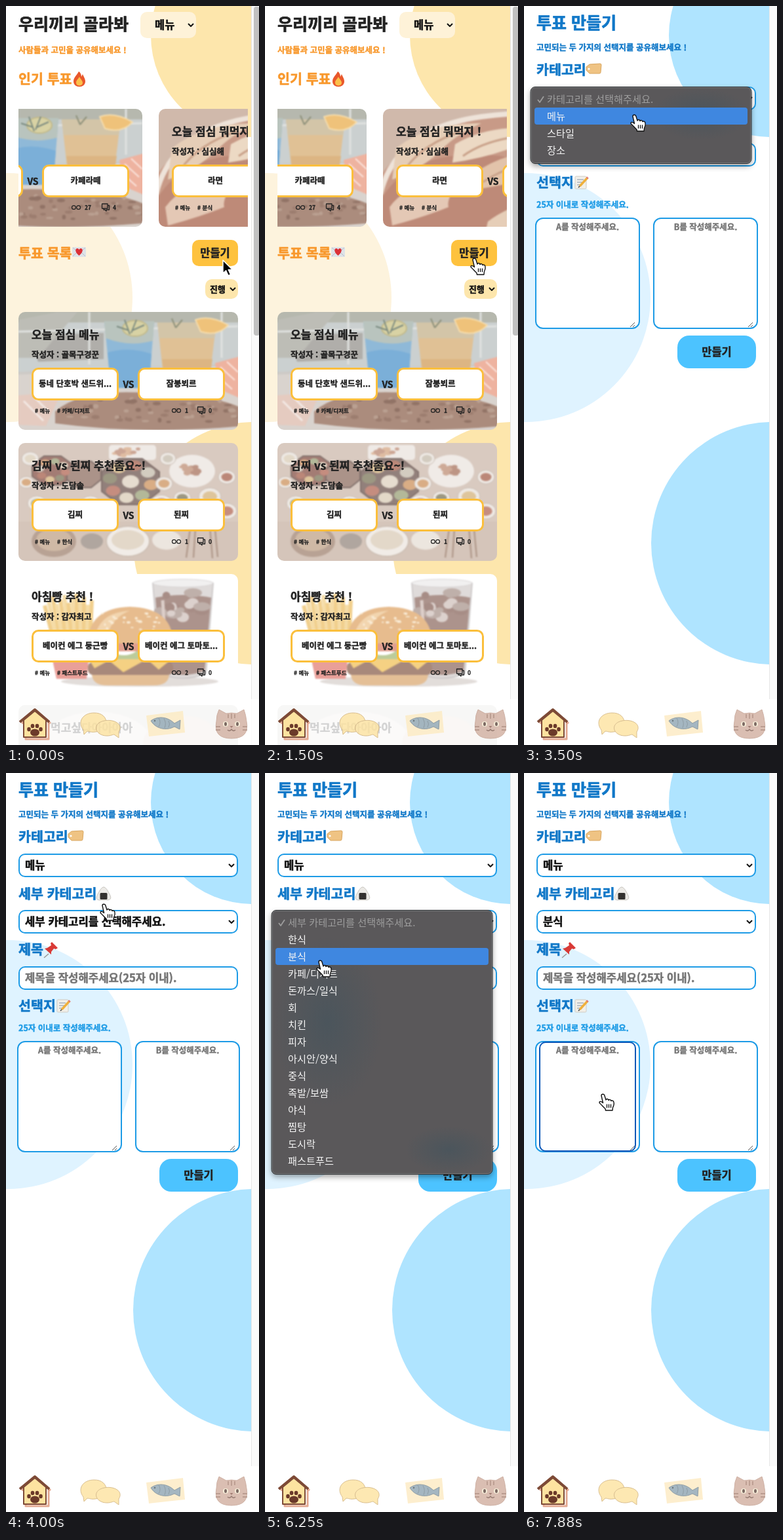
An HTML page for the animation above (8 s loop, 386 px wide and 1128 px high).

```html
<!DOCTYPE html>
<html lang="ko">
<head>
<meta charset="utf-8">
<title>투표</title>
<style>
html, body { margin: 0; width: 100%; height: 100%; overflow: hidden; background: #fff; }
svg { display: block; width: 100%; height: 100%; }
text { font-family: "Noto Sans CJK KR", "Noto Sans KR", "Noto Sans CJK JP", "Noto Sans CJK", sans-serif; font-weight: 700; stroke-linejoin: round; }
.menu text { font-weight: 500; stroke: none; }
</style>
</head>
<body>
<svg id="stage" viewBox="0 0 386 1128" preserveAspectRatio="none"></svg>
<script>
const LOOP = 8000, STEP = 125;
const BLUE = '#1178c8', SKY = '#1d9be6', ORANGE = '#f8982c', GRAY = '#757575';

// y is the middle of the line; the thin outline gives a heavier weight
const text = (x, y, s, size, fill = '#222', anchor = 'start') =>
  `<text x="${x}" y="${y + size * .37}" font-size="${size}" fill="${fill}" stroke="${fill}" stroke-width="${size * .03}" text-anchor="${anchor}">${s}</text>`;
const mid = (x, y, s, size, fill) => text(x, y, s, size, fill, 'middle');
const rect = (x, y, w, h, r, fill, stroke = 'none', sw = 0) =>
  `<rect x="${x}" y="${y}" width="${w}" height="${h}" rx="${r}" fill="${fill}" stroke="${stroke}" stroke-width="${sw}"/>`;
const oval = (x, y, rx, ry, fill, stroke = 'none', sw = 1) =>
  `<ellipse cx="${x}" cy="${y}" rx="${rx}" ry="${ry}" fill="${fill}" stroke="${stroke}" stroke-width="${sw}"/>`;
const shape = (d, fill, stroke = 'none', sw = 1) =>
  `<path d="${d}" fill="${fill}" stroke="${stroke}" stroke-width="${sw}" stroke-linejoin="round"/>`;
const line = (d, stroke, sw) => shape(d, 'none', stroke, sw);
const at = (x, y, body) => `<g transform="translate(${x} ${y})">${body}</g>`;
const chevron = (x, y) => line(`M${x - 4} ${y - 2}l4 4l4-4`, '#111', 2);
const backdrop = fill => rect(-9, -9, 353, 198, 0, fill);

function specks(n, x, y, w, h, size, colors, seed) {
  const rnd = () => (seed = seed * 16807 % 2147483647) / 2147483647;
  let out = '';
  while (n--) out += oval(x + rnd() * w, y + rnd() * h, size * (.6 + rnd()), size * (.4 + rnd() * .5), colors[n % colors.length]);
  return out;
}

const photos = {
  drinks: () => backdrop('#cdcac6') + rect(-9, -9, 353, 25, 0, '#b6b8ae') +
    shape('M-9 16H344V78L-9 92Z', '#cbd0d0') + shape('M16 36L130 32V72L30 76Z', '#b0aeaa') +
    shape('M0 12L60 0H90L30 70H0Z', '#bdbdb6') + line('M0 30L335 22M108 0V80M310 0V70', '#e0e2e0', 3) +
    shape('M-9 96L344 82V189H-9Z', '#d9d3ce') +
    shape('M300 78L344 66V134L306 118Z', '#eeb3a0') + line('M308 84l22 20M318 76l17 16M306 100l20 18', '#fbe6df', 2) +
    shape('M-9 128L66 122L42 174L-9 172Z', '#e5cbc0') + line('M8 136l30 30M24 130l22 22', '#f3e9e4', 3) +
    shape('M131 14H207L199 116H141Z', '#8fb9d8') + shape('M131 14H207L205 44Q170 54 133 40Z', '#b9c4be') +
    shape('M136 62Q168 52 203 64L199 116H141Z', '#7bafd8') +
    oval(178, 25, 19, 12, '#d8d2a4', '#c2b98a', 2) + line('M170 34l-8-22M172 32l8-20M168 28l-18-6M174 28l18-8', '#78887e', 2) +
    shape('M212 16H302L291 106H222Z', '#e0c195') + shape('M212 16H302L299 40H215Z', '#d3c5a8') + shape('M219 72H296L291 106H223Z', '#dcb583') +
    shape('M270 12Q292 4 320 20Q304 38 278 30Z', '#efc27a', '#f5dcac', 2) + line('M240 24l-6-14M240 24l10-12', '#8d907a', 2) +
    shape('M56 152Q96 116 200 124Q300 126 344 148V174Q190 188 56 170Z', '#ab8c7d') +
    specks(60, 75, 130, 255, 38, 4, ['#9c7d6f', '#baa091', '#917366'], 11),
  crepe: () => backdrop('#c89a87') + shape('M-9-9H344V30Q180-8 90 26Q30 50-9 110Z', '#d0b9ab') +
    line('M-4 130Q20 30 150 12T340 40', '#eee3d9', 8) +
    shape('M-9 150Q30 66 150 70T344 152V189H-9Z', '#be8a78') +
    shape('M20 60Q70 20 150 22Q110 40 90 62Q60 92 14 108Z', '#e6ceb7') +
    shape('M110 54Q170 18 260 34Q210 46 190 62Q150 76 106 82Z', '#ecd9c4') +
    shape('M140 98Q200 54 300 66Q240 84 230 104Q190 116 136 124Z', '#e2c3aa') +
    shape('M10 150Q40 108 120 106Q96 136 100 150Q60 166 14 178Z', '#e4c8b5') +
    shape('M160 172Q220 126 344 130Q290 150 280 189H156Z', '#e6ceb8') +
    line('M34 92Q60 54 120 34M122 72Q160 44 230 40M152 112Q200 80 270 74', '#c9a189', 3),
  table() {
    const plates = [[12, 60, 11], [28, 92, 14], [70, 96, 13], [218, 92, 16], [250, 84, 13], [292, 82, 17], [318, 52, 13], [228, 24, 12], [222, 62, 13], [110, 92, 14], [18, 24, 13], [318, 104, 15]];
    const food = ['#d9ad85', '#b3b899', '#e3d9c8', '#c58d7f', '#9c9882', '#dec59c', '#bb8778', '#d3ccc0'];
    const octagon = (x, y, rx, ry) => 'M' + [...Array(8)].map((_, i) =>
      [x + rx * Math.cos((i + .5) * Math.PI / 4), y + ry * Math.sin((i + .5) * Math.PI / 4)].map(Math.round).join(' ')).join('L') + 'Z';
    let out = backdrop('#d9cac0') + rect(-9, 120, 353, 69, 0, '#d5c5ba') +
      rect(138, 3, 72, 23, 5, '#efeae6') + specks(16, 148, 8, 52, 12, 4, ['#cca695', '#dfbca2'], 5);
    for (const [x, y, rx, ry, fill] of [[52, 42, 34, 24, '#a37c74'], [100, 48, 28, 22, '#ab9389'], [171, 59, 48, 38, '#92807b']])
      out += shape(octagon(x, y, rx, ry), fill, '#83726d', 2);
    food.forEach((c, i) => {
      const a = (i + .25) * Math.PI / 4;
      out += oval(171 + 32 * Math.cos(a), 59 + 25 * Math.sin(a), 11, 8, c);
      out += oval(52 + 20 * Math.cos(a), 42 + 14 * Math.sin(a), 7, 5, food[(i + 3) % 8]);
    });
    out += oval(171, 59, 13, 10, '#e6dccf') + oval(265, 43, 35, 25, '#f0ebe7') + specks(12, 252, 34, 24, 14, 5, ['#bd9585', '#ceaa97'], 9);
    plates.forEach(([x, y, r], i) => out += oval(x, y, r, r * .8, '#eee9e4', '#c9bcb2') + oval(x, y, r * .65, r * .48, food[i % 8]));
    return out + oval(54, 150, 34, 24, '#b8a294') + oval(54, 148, 27, 17, '#cfb9a5') +
      oval(167, 150, 33, 23, '#f1ece7', '#cec0b5', 2) + oval(167, 148, 25, 15, '#e3d8c9') +
      oval(112, 150, 17, 12, '#b0a69f') + oval(226, 148, 22, 15, '#ece6df') +
      line('M262 130l-6 45M270 130l-3 45M292 128l4 48M300 132l4 42', '#b29b8d', 2.5);
  },
  burger() {
    let out = oval(185, 164, 120, 8, '#dcd6d3');
    for (let i = 0; i < 13; i++) out += line(`M${60 + i * 4} 125L${40 + i * 6} ${48 - i * 7 % 19}`, i % 2 ? '#f3d594' : '#eec575', 6);
    out += shape('M44 94Q78 112 112 88L104 160H58Z', '#e58b82') + shape('M60 110Q80 120 100 108L96 130H64Z', '#f2c06c') +
      shape('M205 14Q250 6 297 14L286 152Q250 166 216 152Z', '#d9d4d3', '#c4bfbf', 2) +
      shape('M209 36Q250 28 294 36L284 148Q250 160 218 148Z', '#9a7c73') +
      specks(16, 220, 26, 60, 40, 9, ['#b29f98', '#d5c8c3', '#94756c'], 21) +
      line('M220 40L226 138', '#d5c4be', 5) + oval(251, 14, 46, 6, '#efeded', '#cfcaca') +
      shape('M112 152H230Q230 170 206 170H136Q112 170 112 152Z', '#dfb27f') +
      rect(106, 134, 130, 20, 8, '#96705f') + shape('M106 128H236L214 146L196 130L160 150L138 132L116 144Z', '#f4c768') +
      shape('M100 118Q118 106 140 118T180 118T238 116Q240 130 220 130H114Z', '#aec184') +
      rect(112, 104, 118, 14, 6, '#da8a78') + shape('M106 106Q106 52 170 50Q236 52 236 106Z', '#e2ae76') +
      shape('M118 90Q128 58 170 56Q144 66 136 92Z', '#f0cc9e') + specks(26, 128, 58, 88, 30, 2.2, ['#f9ead0'], 31);
    return backdrop('#fff') + `<g opacity=".82">${out}</g>`;
  },
  pale: () => backdrop('#d9d6d2') + oval(120, 70, 90, 60, '#ece8e4') + oval(250, 60, 60, 44, '#e6d8cc')
};
const picture = name => `<g clip-path="url(#card)"><g filter="url(#soft)">${photos[name]()}</g></g>`;

const glasses = x => oval(x - 3.6, 150.5, 2.9, 2.9, 'none', '#222', 1.2) + oval(x + 3.6, 150.5, 2.9, 2.9, 'none', '#222', 1.2);
const comment = line('M273.500 152v-7h8.500v7zM276 152v2h2l2 2v-2h4.500v-6.500h-2', '#222', 1.3);

function card(x, y, photo, title, author, a, b, tags, views, replies) {
  const option = (ox, s) => rect(ox + 1.5, 86.5, 130, 47, 9, '#fff', '#fbbf3c', 3) + mid(ox + 66.5, 109, s, 12.5);
  const vx = 261 - 7 * String(views).length;
  return at(x, y, picture(photo) +
    text(20, 35, title, 17) + text(20, 65, '작성자 : ' + author, 12.5) +
    option(20, a) + option(182, b) + mid(168, 111, 'VS', 14) +
    text(25, 150.5, '# ' + tags[0], 8.5) + text(59, 150.5, '# ' + tags[1], 8.5) +
    glasses(vx - 13) + text(vx, 150.5, views, 8.5) + comment + text(290, 150.5, replies, 8.5));
}

const circles = (strong, soft) => `<g clip-path="url(#page)">` +
  oval(376, 45, 155, 155, strong) + oval(3, 445, 190, 190, soft) + oval(379, 820, 185, 185, strong) + '</g>' +
  rect(374.5, 0, 11.5, 1128, 0, '#fafafa') + line('M374.5 0V1128', '#e6e6e6', 1);

const icon = {
  fire: shape('M111 100C108 106 103 109 103 115C103 126 121 126 121 115C121 111 118 107 117 104L115 108C115 104 113 101 111 100Z', '#e9572b') +
    shape('M112 108C110 112 107 113 107 117C107 123 117 123 117 117C117 114 114 112 112 108Z', '#fbc04a'),
  letter: rect(101, 368, 21, 15, 1.5, '#dfe3e8') + line('M102 369l9.5 8l9.5-8M102 382l7-7M121 382l-7-7', '#b7bec8', 1) +
    shape('M111.500 381C105 376 105 370 109 370C110.500 370 111.500 372 111.500 372C111.500 372 112.500 370 114 370C118 370 118 376 111.500 381Z', '#dc3036'),
  tag: shape('M100 89L116 88Q118 88 118 90L117 101Q117 103 115 103L100 103L95 98V93Z', '#efc383', '#d9a65f') + oval(99, 96, 1.6, 1.6, '#fff'),
  rice: shape('M149 174Q153 174 159 187Q162 194 154 194H143Q136 194 139 187Q145 174 149 174Z', '#eceae6', '#c9c6c0') + rect(143.5, 183, 11, 10, 1.5, '#33312f'),
  pin: line('M65 190L58 196', '#9a9a9a', 1.6) + shape('M70 172L79 181L76 183L73 182L69 187L69 191L59 182L63 181L69 177L68 174Z', '#d93a36'),
  memo: rect(78, 260, 17, 19, 1.5, '#f1efe9', '#cfcbc2', 1) + line('M81 265h10M81 269h9M81 273h8', '#a9b2bd', 1.3) +
    line('M97 262L85 275', '#efb03c', 3.4) + line('M85 275l-2 2', '#444', 1.6) + line('M97.500 261.500l-1.500 1.500', '#e27878', 3.4)
};

const nav = cover => `<rect y="1058" width="386" height="70" fill="#fff" opacity="${cover}"/>` +
  line('M24 1095L46 1077L68 1095M30 1094V1119H65V1094', '#e4aa93', 3) +
  shape('M27 1090V1116H61V1090L44 1076Z', '#fde3a0', '#7d4a36', 2) + line('M21 1093L44 1074L66 1093', '#7d4a36', 4) +
  oval(44, 1109, 7, 5.5, '#6b3a2a') + [[35, 1104], [40.5, 1099], [47.5, 1099], [53, 1104]].map(p => oval(...p, 2.8, 3.3, '#6b3a2a')).join('') +
  '<g opacity=".8">' +
  shape('M118 1105C108 1092 118 1079 134 1079C158 1078 160 1107 136 1108C130 1109 127 1107 124 1107L119 1112Z', '#fde3a0', '#cfae74') +
  shape('M172 1108C180 1096 164 1088 150 1091C130 1095 136 1114 154 1114C160 1114 163 1112 165 1112L172 1117Z', '#fde3a0', '#cfae74') +
  shape('M214 1083L270 1076L273 1109L218 1115Z', '#fdebc2') +
  shape('M221 1091C232 1083 247 1085 257 1095L266 1090L265 1104L257 1100C244 1107 228 1103 221 1091Z', '#8ea5b2', '#74858f') +
  line('M233 1087q4 6 0 13M241 1088q4 6 1 14M248 1091q3 5 0 10', '#74858f', 1) + oval(227, 1091, 1.2, 1.2, '#46545c') +
  shape('M325 1074L336 1080Q344 1078 352 1080L363 1074Q366 1082 367 1092Q372 1118 344 1118Q316 1118 321 1092Q321 1082 325 1074Z', '#d1afa0', '#c19c8c') +
  line('M339 1081v6M344 1080v8M349 1081v6M320 1100h7M320 1105h7M361 1100h7M361 1105h7', '#a98475', 1.8) +
  [335, 353].map(x => oval(x, 1096, 4, 4, '#f5ead0') + oval(x, 1096, 2, 3, '#5c463e')).join('') +
  shape('M341.500 1099h5l-2.500 3z', '#8d5f52') + line('M338 1105q3 3 6-1q3 4 6 1', '#7c5a4e', 1.4) + '</g>';

const home = circles('#fde6ac', '#fdf3dd') + rect(378, 1, 9, 502, 4, '#c1c1c1') +
  text(19, 28, '우리끼리 골라봐', 25) + rect(205, 9, 85, 40, 10, '#fef2d8') + text(227, 29, '메뉴', 16.5, '#111') + chevron(282, 29) +
  text(19, 67, '사람들과 고민을 공유해보세요 !', 12.5, ORANGE) +
  text(19, 111, '인기 투표', 20.6, ORANGE) + icon.fire +
  `<g clip-path="url(#strip)"><g id="cards">` +
  card(-360, 157, 'drinks', '오늘 마실 커피', '심심해', '아메리카노', '카페라떼', ['메뉴', '카페/디저트'], 27, 4) +
  card(0, 157, 'crepe', '오늘 점심 뭐먹지 !', '심심해', '라면', '김밥', ['메뉴', '분식'], 12, 2) + '</g></g>' +
  text(19, 377, '투표 목록', 20.6, ORANGE) + icon.letter +
  rect(284, 357, 70, 40, 10, '#fec23e') + mid(319, 377, '만들기', 16.5) +
  rect(304, 417, 50, 30, 10, '#fde6ac') + text(311, 432, '진행', 13, '#111') + chevron(346, 432) +
  card(19, 467, 'drinks', '오늘 점심 메뉴', '골목구경꾼', '동네 단호박 샌드위...', '잠봉뵈르', ['메뉴', '카페/디저트'], 1, 0) +
  card(19, 667, 'table', '김찌 vs 된찌 추천좀요~!', '도담솔', '김찌', '된찌', ['메뉴', '한식'], 1, 0) +
  card(19, 867, 'burger', '아침빵 추천 !', '감자최고', '베이컨 에그 둥근빵', '베이컨 에그 토마토...', ['메뉴', '패스트푸드'], 2, 0) +
  at(19, 1067, picture('pale') + text(49, 35, '먹고싶다아아아아', 17)) + nav(.8);

const field = (y, s, id, fill = '#111') => rect(20, y - 17, 333, 34, 9, '#fff', SKY, 2) +
  `<g id="${id}">${text(29, y, s, 16.7, fill)}</g>`;
const area = (x, s) => rect(x, 324, 158, 168, 11, '#fff', SKY, 2) + mid(x + 79, 337, s, 12.5, GRAY) +
  line(`M${x + 144} 490l7-7M${x + 148} 490l3-3`, '#555', 1);

const form = circles('#afe4ff', '#dff3ff') +
  text(19, 26, '투표 만들기', 25, BLUE) + text(19, 63, '고민되는 두 가지의 선택지를 공유해보세요 !', 12.5, BLUE) +
  text(19, 97, '카테고리', 20.6, BLUE) + icon.tag + field(141, '카테고리를 선택해주세요.', 'pick1') + chevron(344, 141) +
  `<g id="detail">` + text(19, 184, '세부 카테고리', 20.6, BLUE) + icon.rice + field(227, '세부 카테고리를 선택해주세요.', 'pick2') + chevron(344, 227) + '</g>' +
  `<g id="rest">` + text(19, 183, '제목', 20.6, BLUE) + icon.pin + field(227, '제목을 작성해주세요(25자 이내).', 'name', GRAY) +
  text(19, 269, '선택지', 20.6, BLUE) + icon.memo + text(19, 303, '25자 이내로 작성해주세요.', 12.5, SKY) +
  area(18, 'A를 작성해주세요.') + area(198, 'B를 작성해주세요.') +
  `<g id="focus">` + rect(24, 325, 146, 166, 9, 'none', '#0b57b8', 2) + '</g>' +
  rect(234, 503, 120, 50, 18, '#4cc3ff') + mid(294, 528, '만들기', 16.5) + '</g>' + nav(1);

function menu(id, y, items, tints) {
  const h = items.length * 26 + 12;
  return `<g id="${id}" class="menu"><g filter="url(#shade)">${rect(10.5, y - 18, 336, h, 6, '#5a595a')}</g>` +
    tints.map(p => oval(...p, 'url(#tint)')).join('') +
    rect(11, y - 17.5, 335, h - 1, 6, 'none', '#77797b', 1) + rect(10, y - 18.5, 337, h + 1, 7, 'none', '#2f3133', 1) +
    `<g class="bar">${rect(16, y - 13, 325, 26, 4, '#3f87e0')}</g>` + line(`M21 ${y + 1}l3 4l6-9`, '#9d9d9d', 1.8) +
    items.map((s, i) => text(35, y + 26 * i, s, 15.2, i ? '#f4f4f4' : '#9d9d9d')).join('') + '</g>';
}

const menus = menu('menu1', 142, ['카테고리를 선택해주세요.', '메뉴', '스타일', '장소'], [[270, 165, 75, 40]]) +
  menu('menu2', 228, ['세부 카테고리를 선택해주세요.', '한식', '분식', '카페/디저트', '돈까스/일식', '회', '치킨', '피자', '아시안/양식', '중식', '족발/보쌈', '야식', '찜탕', '도시락', '패스트푸드'],
    [[95, 380, 84, 130], [280, 575, 66, 36]]);

const cursors = `<g id="cursor"><g id="arrow">` + shape('M0 0V20L4.6 15.8L8 23.5L11.6 22L8.3 14.5H14.5Z', '#000', '#fff', 1.5) + `</g><g id="hand">` +
  shape('M-3 2.5C-3.3 0 .8-.8 1.8 2L4 9C4.5 7 7.5 7 8 9.5C9 8 11.5 8.3 12 10.5C13 9.5 15.5 10 16 12.5C16.6 15 16 18 14.5 20.5L14 25H3.5L3 22.5C0 20-2 17-5.5 14C-7 12-4.5 10.5-2.5 12L-.5 13.5Z', '#fff', '#111', 1.4) +
  line('M5.5 15.500v5.500M8.5 15.500v5.500M11.5 15.500v5.500', '#111', 1.3) + '</g></g>';

const $ = id => document.getElementById(id);
$('stage').innerHTML = `<defs>
  <clipPath id="card"><rect width="335" height="180" rx="10"/></clipPath>
  <clipPath id="strip"><rect x="19" y="157" width="350" height="180"/></clipPath>
  <clipPath id="page"><rect width="374" height="1128"/></clipPath>
  <radialGradient id="tint"><stop stop-color="#4b555c"/><stop offset="1" stop-color="#4b555c" stop-opacity="0"/></radialGradient>
  <filter id="soft" color-interpolation-filters="sRGB"><feGaussianBlur stdDeviation="1"/></filter>
  <filter id="shade" x="-10%" y="-10%" width="120%" height="125%"><feDropShadow dx="0" dy="4" stdDeviation="5" flood-opacity=".4"/></filter>
  </defs><g id="home">${home}</g><g id="form">${form}${menus}</g>${cursors}`;

// step, x, y of the pointer tip
const PATH = [[0, 331, 388], [7, 324, 381], [12, 320, 385], [14, 320, 385], [19, 185, 143], [21, 180, 143], [24, 172, 160],
  [28, 169, 166], [30, 165, 175], [34, 135, 225], [36, 128, 232], [38, 112, 269], [42, 98, 283], [50, 85, 286],
  [53, 87, 300], [59, 119, 480], [63, 121, 490]];
const SLIDE = [[0, 233], [7, 201], [12, 180], [14, 172]];

function along(keys, n, ease = k => k) {
  const i = keys.findIndex(k => k[0] > n);
  if (i < 0) return keys[keys.length - 1].slice(1);
  const [a, b] = [keys[i - 1], keys[i]], k = ease((n - a[0]) / (b[0] - a[0]));
  return a.slice(1).map((v, j) => v + (b[j + 1] - v) * k);
}
const pointer = n => along(PATH, n, k => k * k * (3 - 2 * k));
const show = (id, on) => $(id).style.display = on ? '' : 'none';
const move = (el, x, y) => el.setAttribute('transform', `translate(${x} ${y})`);
const label = (id, s) => $(id).firstChild.textContent = s;

function openMenu(id, top, rows, on, y) {
  show(id, on);
  const row = Math.floor((y - top + 13) / 26), bar = $(id).querySelector('.bar');
  bar.style.display = row > 0 && row < rows ? '' : 'none';
  move(bar, 0, row * 26);
}

let last = -1;
function draw(t) {
  const n = Math.floor(t / STEP);
  if (n === last) return;
  last = n;
  const picked = n >= 29, done = n >= 51;
  show('home', n < 13);
  show('form', n >= 13);
  move($('cards'), along(SLIDE, n)[0], 0);
  label('pick1', picked ? '메뉴' : '카테고리를 선택해주세요.');
  label('pick2', done ? '분식' : '세부 카테고리를 선택해주세요.');
  show('detail', picked);
  move($('rest'), 0, picked ? 86 : 0);
  show('focus', n >= 60);
  // the highlight trails the pointer by one step
  const y = pointer(Math.max(0, n - 1))[1];
  openMenu('menu1', 142, 4, n >= 20 && n < 29, y);
  openMenu('menu2', 228, 15, n >= 36 && n < 51, y);
  show('arrow', n < 10);
  show('hand', n >= 10);
  move($('cursor'), ...pointer(n));
}

const start = performance.now();
(function tick() {
  draw((performance.now() - start) % LOOP);
  requestAnimationFrame(tick);
})();
</script>
</body>
</html>
```
